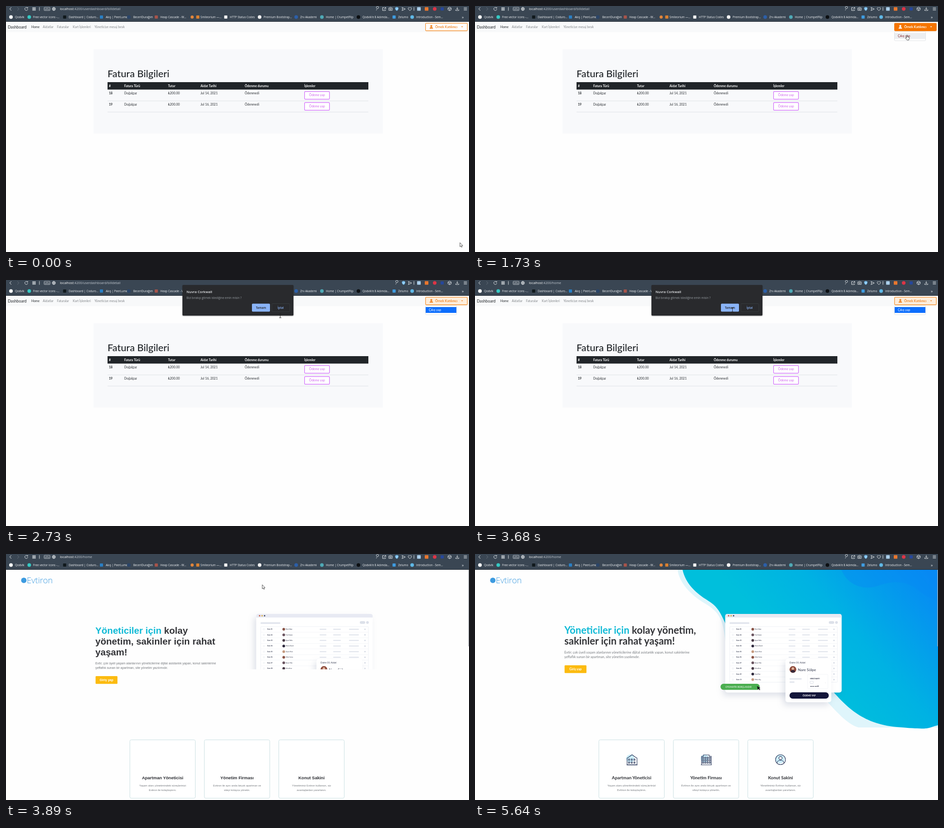
An HTML page that plays this animation: 1026 by 546 pixels, repeating every 6170 ms.

```html
<!DOCTYPE html>
<html lang="tr">
<head>
<meta charset="utf-8">
<title>Fatura Bilgileri</title>
<style>
  html, body { margin: 0; width: 100%; height: 100%; overflow: hidden; background: #fefefe; }
  svg { display: block; width: 100vw; height: 100vh; }
  text { white-space: pre; }
  .lato { font-family: Lato, sans-serif; }
  .ui { font-family: "Open Sans", sans-serif; }
  .arial { font-family: "Liberation Sans", Arial, sans-serif; }
  .mid { text-anchor: middle; }
  .b { font-weight: 700; }
  .line { fill: none; stroke: #e3e7ea; stroke-width: 1; }
</style>
</head>
<body>
<svg id="stage" viewBox="0 0 1026 546" preserveAspectRatio="none"></svg>
<script>
const LOOP = 6170;

// Markup helpers
const text = (x, y, size, fill, str, cls = '') =>
  `<text x="${x}" y="${y}" font-size="${size}" fill="${fill}" class="${cls}">${str}</text>`;
const rect = (x, y, w, h, fill, r = 0, more = '') =>
  `<rect x="${x}" y="${y}" width="${w}" height="${h}" rx="${r}" fill="${fill}" ${more}/>`;
const disc = (x, y, r, fill, more = '') => `<circle cx="${x}" cy="${y}" r="${r}" fill="${fill}" ${more}/>`;
const path = (d, fill, more = '') => `<path d="${d}" fill="${fill}" ${more}/>`;
const line = (d, x = 0, y = 0) => `<path class="line" d="${d}" transform="translate(${x} ${y})"/>`;
const group = (id, body, cls = '') => `<g id="${id}" class="${cls}">${body}</g>`;
const border = (color, w = 1) => `stroke="${color}" stroke-width="${w}"`;

// Browser bars
const bookmarks = [
  [11, 20, 'Qodvik', '#fff'], [51.5, 60, 'Free vector icons -...', '#35c9c4'],
  [130, 139, 'Dashboard | Coduro...', '#10181c', 1], [211.5, 221, 'Akış | PeerLume', '#2a7fc4', 1],
  [272, 282, 'BeceriDurağım', '#2b4568'], [333, 342, 'Heap Cascade - W...', '#a8544a', 1],
  [412.5, 0, '', '#e0853c'], [425, 431, 'Smileorium —...', '#d9802f', 1],
  [487, 496, 'HTTP Status Codes', '#f2f2f2', 1], [562, 571, 'Premium Bootstrap...', '#f2f2f2'],
  [643, 652, 'Zrv Akademi', '#2c5fa8'], [700, 709, 'Home | CrumpetFlip', '#4fa9b5'],
  [781, 790, "Qodvik'e 8 Adımda...", '#0c0f12'], [860, 869, 'Zelumo', '#3f9be0', 1],
  [900, 909, 'Introduction - Sem...', '#5fb8e6']
];
const bookmark = ([iconX, textX, label, color, square]) =>
  (square ? rect(iconX - 3.5, 21, 7, 7, color, 1) : disc(iconX, 24.5, label ? 4 : 3.5, color)) +
  text(textX, 27, 6.3, '#f4f6f8', label);

const search = 'M1 -1a2.6 2.6 0 1 0-.1 .1M-1.6 1.2L-4 3.5';
const shield = x => path(`M${x - 3.5} 3.5l3.5-1.2 3.5 1.2v3q-.5 3-3.5 4.2-3-1.2-3.5-4.2z`, '#7cc4f5') +
  line('M-1.5 0l1.2 1.3L1.7 -1.3', x, 6.5);
const send = 'M-3.5 -3.5L4 0L-3.5 3.5L-2 0Z';
const fullTools = line(search, 824, 6) + line('M0 -3h-3.5v6.5h6.5V1M-1 1.5L3.5 -3M1 -3.2h2.7v2.7', 838, 6.5) +
  line('M-3.7 -2.5h2l1-1.2h1.6l1 1.2h2v5.5h-7.6zM1.5 0a1.5 1.5 0 1 0-3 0a1.5 1.5 0 1 0 3 0', 852, 6.7) +
  shield(866) + line(send, 881, 6.7) +
  line('M0 3.7C-7 -1 -2.5 -5.3 0 -2C2.5 -5.3 7 -1 0 3.7Z', 895, 6.5);
const briefTools = line(search, 867, 6) + shield(881) + line(send, 895, 6.7);

const chrome =
  rect(0, 0, 1026, 35, '#3a4653') + rect(0, 34, 1026, 1, '#222a32') +
  line('M2 -3.5L-2 0L2 3.5', 10, 6.5) + `<g opacity=".25">${line('M-2 -3.5L2 0L-2 3.5', 27, 6.5)}</g>` +
  line('M2.6 -2.2A3.4 3.4 0 1 0 3.4 .5M3.2 -4v2.2h-2.2', 45, 6.5) +
  line('M-3 -3h2.4v2.4h-2.4zM.8 -3h2.4v2.4H.8zM-3 .8h2.4v2.4h-2.4zM.8 .8h2.4v2.4H.8z', 62, 6.5) +
  line('M0 -4V4', 74, 6.5) + rect(84.5, 3, 13, 7, 'none', 1, border('#dfe4e8', .8)) +
  text(91, 8.6, 5, '#e8ecef', 'VPN', 'mid') +
  line('M3.6 0a3.6 3.6 0 1 0-7.2 0a3.6 3.6 0 1 0 7.2 0M-3.6 0H3.6M0 -3.6q-3 3.6 0 7.2q3-3.6 0-7.2', 106, 6.5) +
  '<text x="119.5" y="9.3" font-size="7.25" fill="#c3cad1"><tspan fill="#fff">localhost</tspan>:4200<tspan id="route"></tspan></text>' +
  group('fullTools', fullTools) + group('briefTools', briefTools) + line('M0 -4V4', 904, 6.5) +
  rect(911, 2.5, 8, 8, '#a9cdea', 1) + rect(928, 2.5, 8, 8, '#e8772e', 1) + disc(950, 6.5, 4, '#dc3546') +
  rect(963, 3, 7, 7, '#26479a', 1) + line('M0 -4L3.6 -2V2L0 4L-3.6 2V-2ZM-3.6 -2L0 0L3.6 -2M0 0V4', 983, 6.5) +
  line('M0 -4V1.5M-2 -.5L0 1.5L2 -.5M-3.5 1.5V3.5H3.5V1.5', 1000, 6.5) +
  line('M-3.5 -2.7H3.5M-3.5 0H3.5M-3.5 2.7H3.5', 1018, 6.5) +
  bookmarks.map(bookmark).join('') + text(1010, 27.5, 9, '#e8ecef', '»');

// Bill list
const columns = [228, 262, 359, 431, 529, 661];
const tableRow = (y, cells, color, allBold) => cells.map((cell, i) =>
  text(columns[i], y, 7, color, cell, allBold || !i ? 'b' : '')).join('');
const billRow = (y, id, date) =>
  tableRow(y, [id, 'Doğalgaz', '₺200.00', date, 'Ödenmedi'], '#292d31') +
  rect(661.6, y - 6.4, 55.2, 17, '#fff', 1.5, border('#cf63fb', 1.2)) +
  text(689.2, y + 4.2, 7, '#cf63ee', 'Ödeme yap', 'mid') + rect(225, y + 14, 578, 1, '#dee2e6');
const nav = [[56, 'Home', '#212529'], [81.5, 'Aidatlar'], [113, 'Faturalar'], [148, 'Kart İşlemleri'], [196, 'Yöneticiye mesaj bırak']];

const bills =
  rect(0, 35, 1026, 511, '#fefefe') + rect(0, 35, 1026, 23, '#f8f9fa') +
  text(4, 50.3, 8.75, '#212529', 'Dashboard') +
  nav.map(([x, label, color = '#808488']) => text(x, 49, 6.9, color, label)).join('') +
  rect(194, 96, 641, 187, '#f8f9fb') + text(225, 157.5, 21.8, '#212529', 'Fatura Bilgileri', 'title') +
  rect(225, 169, 578, 16.5, '#212529') +
  tableRow(179.5, ['#', 'Fatura Türü', 'Tutar', 'Aidat Tarihi', 'Ödenme durumu', 'İşlemler'], '#fff', true) +
  billRow(196.2, 18, 'Jul 14, 2021') + billRow(220.8, 19, 'Jul 16, 2021') +
  group('menu', rect(929.5, 56.5, 69, 20.5, '#fff', 2, border('#dcdfe2', .9)) +
    rect(930, 60, 68, 13, '#fff', 0, 'id="menuItem"') + text(937, 69, 7, '#842029', 'Çıkış yap', 'menuText')) +
  group('user', rect(929.7, 38.3, 92.6, 16.7, '#fff', 1.5, 'id="userBox" ' + border('#f59331', 1.3)) +
    '<g id="userLabel" fill="#f0882a">' + disc(942.5, 44.5, 2.2, 'inherit') +
    path('M938.7 50.3q0-3.6 3.8-3.6t3.8 3.6z', 'inherit') +
    text(951, 49, 7.1, 'inherit', 'Örnek Katılımcı', 'b') + path('M1008.5 45.3h4.4l-2.2 2.3z', 'inherit') + '</g>');

// Product picture on the landing page
const residents = ['Nare Sölpe', 'Tirel Gönak', 'Ayzin Relke', 'Mavra Düzek', 'Zeyna Pulat', 'Gülev Sorna', 'Boran Tilke', 'Selva Aruz', 'Yavel Nur', 'Melza Koş'];
const skins = ['#8a5548', '#6a5560', '#4a3c48', '#2f2a3e', '#c59a80'];
const residentRow = (name, i) => {
  const y = 167 + i * 12.43;
  const bar = (x, w) => rect(x, y - 1, w, 2, '#dde1ea', 1);
  return rect(570, y - 1.5, 3, 3, '#fff', .5, border('#d7dce5', .5)) +
    text(579, y + 1.1, 3, '#30364c', `Daire ${String(i + 1).padStart(2, '0')}`, 'b') +
    disc(615.5, y, 3, skins[i % 5]) + text(620, y + 1.1, 3, '#30364c', name) +
    bar(695, 15) + bar(725, 17) + bar(760, 22) + disc(795.5, y, 1.6, '#d5dae4') +
    (i ? rect(564, y - 6.2, 239, .6, '#eceff4') : '');
};
const shadow = 'style="filter:drop-shadow(-5px 7px 7px rgba(70,90,130,.17))"';
const product =
  rect(554.5, 133, 258, 174.5, '#fff', 5, shadow) +
  path('M554.5 141v-3q0-5 5-5h248q5 0 5 5v3z', '#e8eaf3') +
  disc(562, 137, 1.6, '#c4503c') + disc(567.5, 137, 1.6, '#d8a630') + disc(573, 137, 1.6, '#353b58') +
  rect(564, 151.7, 44, 3, '#dde1ea', 1.5) + rect(784, 149, 12, 6, '#dde1ea', 3) + disc(801, 152, 3, '#dde1ea') +
  rect(564.5, 161, 238.5, 123.5, 'none', 1, border('#e6eaf1', .7)) + residents.map(residentRow).join('') +
  rect(688, 233, 101.5, 96, '#fff', 5, shadow) + text(697, 243.2, 5.6, '#3c4257', 'Daire 01 Aidat') +
  disc(704.5, 256.3, 7.5, '#8f4d3d') + disc(704.5, 254.3, 2.8, '#e0b6a0') +
  path('M699.5 261.5q0-4 5-4t5 4q-5 4-10 0z', '#38293a') + text(715.5, 259.7, 8.4, '#30364c', residents[0]) +
  rect(697, 276, 27, 2.4, '#dde1ea', 1.2) + rect(697, 283, 11, 2.4, '#dde1ea', 1.2) +
  rect(737, 267, 45, 32, '#fff', 2, border('#f0f2f6', .8)) + text(742.5, 278, 3.5, '#262b40', 'KREDİ KARTI', 'b') +
  rect(742.5, 282, 7, 5.5, '#fff', 1, border('#c8cedb', .7)) + text(776, 287, 4, '#9aa2b3', '›') +
  text(742.5, 294.5, 4, '#262b40', '•••• ••89', 'b') +
  rect(697, 307, 87, 14, '#14163a', 7) + text(740.5, 315.8, 5, '#fff', 'ÖDEME YAP', 'mid b') +
  rect(544, 288, 87, 13.5, '#4bae50', 6.7) + text(555, 296.5, 4.9, '#fff', 'OTOMATİK BORÇLANDIR') +
  path('M625 293l1.5 8.5 1.8-2 2.3 2.8 1.4-1.2-2.2-2.7 2.5-.8z', '#111');

const wave =
  path('M449 35C452 62 476 90 510 110S550 150 555 195C575 262 700 262 765 310C800 350 825 378 850 385H1026V35Z', '#dff5fb') +
  path('M460 35C468 72 498 92 523 108C552 128 552 165 580 195C620 240 725 240 785 296C820 335 855 377 935 384S1000 386 1026 380V35Z', 'url(#sea)') +
  path('M812 35C826 70 862 82 895 70S958 60 982 80S1012 95 1026 108V35Z', '#078af2', 'opacity=".45"');

// Landing page
const cards = [
  [347, 'Apartman Yöneticisi', 'Yaşam alanı yönetimindeki süreçlerinizi', 'Evtiron ile kolaylaştırın.'],
  [512, 'Yönetim Firması', 'Evtiron ile aynı anda birçok apartman ve', 'siteyi kolayca yönetin.'],
  [677, 'Konut Sakini', 'Yönetiminiz Evtiron kullansın, siz', 'avantajlardan yararlanın.']
];
const copy = (top, headSize, bodySize, cardSize, noteSize, head, paragraph) =>
  `<text x="198" y="177" font-size="${headSize}" fill="#333438" class="b"><tspan fill="#10bad6">Yöneticiler için</tspan> ${head[0]}</text>` +
  head.slice(1).map((str, i) => text(198, 201 + i * 24, headSize, '#333438', str, 'b')).join('') +
  paragraph.map((str, i) => text(198, top - 26 + i * 10, bodySize, '#73777c', str)).join('') +
  rect(198.5, top, 48.5, 17.3, '#fcbb10', 1.5) + text(222.7, top + 11, 7.1, '#fff', 'Giriş yap', 'mid b') +
  cards.map(([x, title, ...notes]) => text(x, 500, cardSize, '#2c2e33', title, 'mid b') +
    notes.map((str, i) => text(x, 516 + i * 9.6, noteSize, '#73777c', str, 'mid')).join('')).join('');
const paragraph = ['Evtir; çok üyeli yaşam alanlarının yöneticilerine dijital asistanlık yapan, konut sakinlerine',
  'şeffaflık sunan bir apartman, site yönetim yazılımıdır.'];

const ink = 'stroke="#1c2c52" stroke-width="1.1"';
const windows = (x0, y0, cols, rows, dx, dy) => Array.from({ length: cols * rows }, (_, i) =>
  rect(x0 + i % cols * dx, y0 + Math.floor(i / cols) * dy, 2.6, 3, '#fff', 0, ink)).join('');
const cardIcons =
  disc(344, 454, 9, '#cdeefa') + path('M337 468V453l5-3 6-4.5 6 4.5 5 3v15z', 'none', ink) +
  windows(340, 455, 3, 2, 6, 6.5) + path('M336 468h24', 'none', ink) +
  disc(509, 454, 9, '#cdeefa') + path('M502 468V449h4v-3h13v3h4.500v19zM500.500 468h24', 'none', ink) +
  windows(504, 451, 4, 3, 5, 5.2) +
  disc(676, 455, 10, '#cdeefa') + disc(677, 456.5, 11, 'none', ink) + disc(677, 453, 3.6, '#fff', ink) +
  path('M669.500 464q0-6 7.500-6t7.500 6', 'none', ink);

const landing =
  rect(0, 35, 1026, 511, '#fefefe') + group('wave', wave) +
  disc(39.500, 58.500, 6, '#3d9be0') +
  text(46, 64.500, 18.500, '#3d9be0', 'Evtiron', 'ui brand') +
  `<g clip-path="url(#loadedPart)">${product}</g>` +
  cards.map(([x]) => rect(x - 72.500, 412.500, 145, 129.500, '#fff', 3, border('#c3dcdf', .9))).join('') +
  group('cardIcons', cardIcons) +
  group('plainCopy', copy(271, 20.6, 6.9, 9.5, 5.95, ['kolay', 'yönetim, sakinler için rahat', 'yaşam!'], paragraph), 'arial') +
  group('richCopy', copy(247, 22.1, 7.3, 9.8, 6.3, ['kolay yönetim,', 'sakinler için rahat yaşam!'], paragraph), 'lato') +
  rect(1024.6, 35, 1.4, 170, '#a9adb2');

// Confirmation box
const dialog = rect(391, 11, 246, 68, '#292a2d', 2, 'style="filter:drop-shadow(0 1px 1px rgba(0,0,0,.4))"') +
  text(400, 29, 7.7, '#e8eaed', 'Nuvra Corkwall', 'semi') +
  text(400, 42.3, 6.3, '#9aa0a6', 'Bizi bırakıp gitmek istediğine emin misin ?') +
  rect(545, 52.5, 40, 17.8, '#8ab4f8', 2) + text(565, 63.7, 6.3, '#202124', 'Tamam', 'mid semi') +
  rect(589, 52.5, 40, 17.8, 'none', 2, border('#3c4043', .8)) + text(608.500, 63.7, 6.3, '#8ab4f8', 'İptal', 'mid semi');

const pointers = {
  arrow: path('M0 0V9L2 7.200L3.500 10.200L4.900 9.500L3.500 6.600H6.300Z', '#fff', border('#222', .8)),
  hand: path('M-.7 1Q.3 -.3 1.300 1V4.500L4.800 5.300Q5.500 5.700 5.300 7L4.500 11.500H.2L-3.200 7.500Q-3 6 -1.700 6.500L-.7 7.300Z', '#fff', border('#222', .8)),
  beam: path('M-1.500 -4.500H3.500M1 -4.500V4.500M-1.500 4.500H3.500', 'none', border('#222', .9))
};

const stage = document.getElementById('stage');
stage.innerHTML =
  `<defs><linearGradient id="sea" gradientUnits="userSpaceOnUse" x1="720" y1="250" x2="990" y2="20">
    <stop offset="0" stop-color="#00bfdc"/><stop offset=".4" stop-color="#00b2e3"/><stop offset="1" stop-color="#0788f4"/></linearGradient>
    <clipPath id="loadedPart"><rect id="loaded" x="520" y="120" width="310" height="136"/></clipPath></defs>
  <style>.title, .semi { font-weight: 600 } .title { font-weight: 500 } .brand { font-weight: 300 }</style>` +
  group('bills', bills, 'lato') + group('landing', landing, 'lato') + group('chrome', chrome, 'ui') +
  group('dialog', dialog, 'ui') +
  group('pointer', Object.entries(pointers).map(([id, body]) => group(id, body)).join(''));

const el = id => document.getElementById(id);
const show = (id, on) => el(id).setAttribute('display', on ? 'inline' : 'none');
const menuText = stage.querySelector('.menuText');

// Pointer path: time, x, y
const route = [
  [0, 1006, 526], [670, 969, 61], [870, 981, 44], [1000, 981, 44], [1130, 983, 55], [1330, 983, 55],
  [1730, 957, 64], [1930, 957, 64], [2000, 957, 70], [2130, 957, 70], [2600, 643, 85], [2900, 560, 72],
  [3080, 569.5, 67], [3830, 569.5, 66], [4150, 561, 78], [4420, 434, 90], [4820, 199, 47],
  [4950, 126, 60], [5430, 856, 459], [5570, 906, 526], [LOOP, 906, 526]
];
function pointerAt(t) {
  const i = route.findIndex(key => key[0] > t);
  const [t0, x0, y0] = route[i - 1], [t1, x1, y1] = route[i];
  const p = (t - t0) / (t1 - t0);
  return [x0 + (x1 - x0) * p, y0 + (y1 - y0) * p];
}

// The dialog fades in a few coarse steps
const fades = [[0, 0], [2070, .12], [2130, .47], [2200, .85], [2270, 1], [3750, .5], [3830, .06], [3890, 0]];
const dialogAlpha = t => fades.filter(([start]) => start <= t).pop()[1];

function draw(t) {
  const asked = t >= 2000, left = t >= 3620, home = t >= 3750, loaded = t >= 3950;
  const open = t >= 800 && !asked;

  el('route').textContent = left ? '/home' : '/userdashboard/billdetail';
  show('briefTools', asked && !left);
  show('fullTools', !asked || left);

  show('bills', !home);
  show('menu', t >= 1070);
  el('menuItem').setAttribute('fill', asked ? '#0d6efd' : t >= 1530 ? '#eceef0' : '#fff');
  menuText.setAttribute('fill', asked ? '#fff' : '#842029');
  el('userBox').setAttribute('fill', open ? '#f57500' : asked ? '#fdeedd' : '#fff');
  el('userBox').setAttribute('stroke', open ? '#f57500' : '#f59331');
  el('userLabel').setAttribute('fill', open ? '#fff' : '#f0882a');

  show('landing', home);
  show('wave', loaded);
  show('cardIcons', loaded);
  show('richCopy', loaded);
  show('plainCopy', !loaded);
  el('loaded').setAttribute('height', loaded ? 240 : 136);

  const alpha = dialogAlpha(t);
  show('dialog', alpha > 0);
  el('dialog').setAttribute('opacity', alpha);
  el('dialog').setAttribute('transform', `translate(0 ${-8 * (1 - alpha)})`);

  const shape = home || t < 800 ? 'arrow' : asked ? 'beam' : 'hand';
  for (const id in pointers) show(id, id === shape);
  show('pointer', t < 5640);
  el('pointer').setAttribute('transform', `translate(${pointerAt(t)})`);
}

const start = performance.now();
function tick() {
  draw((performance.now() - start) % LOOP);
  requestAnimationFrame(tick);
}
tick();
</script>
</body>
</html>
```
